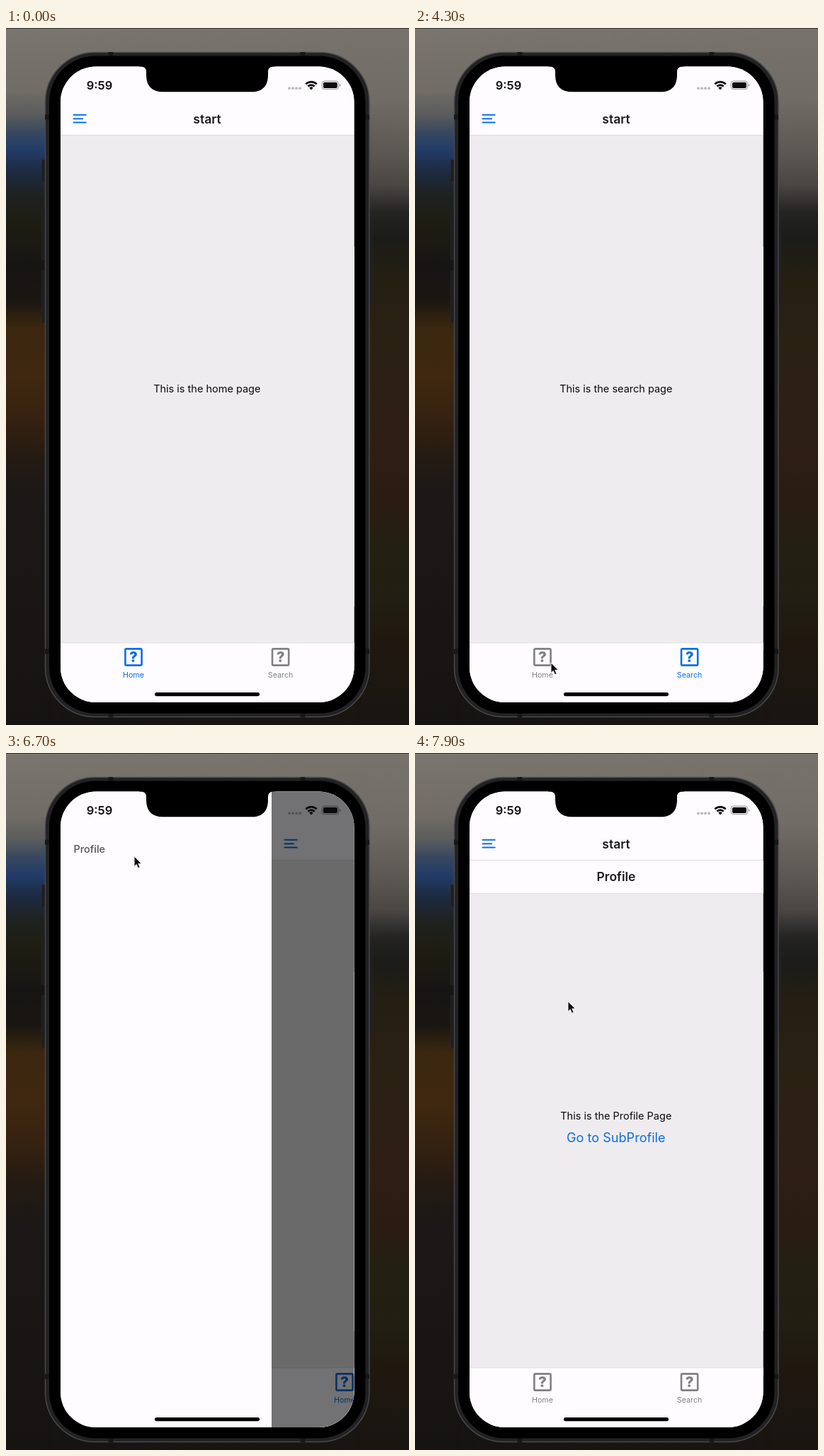
Write an HTML page that moves like this. It is 569 px wide and 985 px high and loops after 8000 ms.

```html
<!DOCTYPE html>
<html lang="en">
<head>
<meta charset="utf-8">
<title>Drawer and tabs</title>
<style>
html, body { margin: 0; width: 100%; height: 100%; overflow: hidden; background: #191715; }
svg { display: block; width: 569px; height: 985px; font-family: Inter, "Noto Sans", sans-serif; }

.title { font-size: 17.5px; font-weight: 600; fill: #1c1b1f; text-anchor: middle; }
.body { font-size: 14.5px; fill: #0a0a0b; text-anchor: middle; }
.link { font-size: 18.1px; fill: #0a6ee6; text-anchor: middle; }
.label { font-size: 10.7px; fill: currentColor; text-anchor: middle; }
.mark { font-size: 20.5px; font-weight: 800; fill: currentColor; text-anchor: middle; }
.item { font-size: 14.4px; font-weight: 500; fill: #535255; }
.clock { font-size: 16.5px; font-weight: 600; fill: #0c0c0d; text-anchor: middle; }
.tab { color: #808082; }

/* one loop is 8 s, so 1% is 80 ms */
.slide { animation: slide 8s infinite; }
.shade { animation: shade 8s infinite; }
.menu { animation: press 8s linear infinite; }
.cursor { animation: move 8s linear infinite, blink 8s step-end infinite; }
.home { animation: home 8s step-end infinite; }
.search { animation: search 8s step-end infinite; }
.profile { animation: profile 8s step-end infinite; }
.tab-home { animation: tab-home 8s step-end infinite; }
.tab-search { animation: tab-search 8s step-end infinite; }

@keyframes slide {
  0%, 73.81% { transform: translateX(0); animation-timing-function: cubic-bezier(.3333, 1, .6667, 1); }
  82% { transform: translateX(298px); }
  88.15% { transform: translateX(298px); animation-timing-function: cubic-bezier(.3333, 1, .6667, 1); }
  96.3%, 100% { transform: translateX(0); }
}
@keyframes shade {
  0%, 73.81% { opacity: 0; animation-timing-function: cubic-bezier(.3333, 1, .6667, 1); }
  82% { opacity: .548; }
  88.15% { opacity: .548; animation-timing-function: cubic-bezier(.3333, 1, .6667, 1); }
  96.3%, 100% { opacity: 0; }
}
@keyframes press {
  0%, 73.4% { opacity: 1; }
  73.75% { opacity: .3; }
  74.8% { opacity: .3; }
  79%, 100% { opacity: 1; }
}
@keyframes move {
  0%, 1.25% { transform: translate(181px, 880px); }
  3.7% { transform: translate(167px, 506px); }
  17.5% { transform: translate(167px, 506px); }
  20% { transform: translate(184px, 418px); }
  21.25% { transform: translate(184px, 418px); }
  23.75% { transform: translate(138px, 250px); }
  25% { transform: translate(138px, 250px); }
  32.5% { transform: translate(285px, 826px); }
  33.75% { transform: translate(285px, 826px); }
  37.5% { transform: translate(400px, 893px); }
  39.5% { transform: translate(398px, 892px); }
  42.5% { transform: translate(325px, 891px); }
  45% { transform: translate(318px, 891px); }
  53.75% { transform: translate(192px, 897px); }
  55% { transform: translate(192px, 897px); }
  57.5% { transform: translate(184px, 897px); }
  62.5% { transform: translate(184px, 897px); }
  66.25% { transform: translate(189px, 306px); }
  72% { transform: translate(100px, 126px); }
  74.5% { transform: translate(100px, 126px); }
  76.25% { transform: translate(111px, 131px); }
  83.75% { transform: translate(181px, 146px); }
  87% { transform: translate(177px, 140px); }
  91.25% { transform: translate(177px, 140px); }
  98.75%, 100% { transform: translate(216px, 351px); }
}
@keyframes blink {
  0% { visibility: hidden; }
  1.2% { visibility: visible; }
  3.7% { visibility: hidden; }
  9.95% { visibility: visible; }
}
@keyframes home {
  0% { visibility: visible; }
  38.7% { visibility: hidden; }
  59.9% { visibility: visible; }
  88% { visibility: hidden; }
}
@keyframes search {
  0% { visibility: hidden; }
  38.7% { visibility: visible; }
  59.9% { visibility: hidden; }
}
@keyframes profile {
  0% { visibility: hidden; }
  88% { visibility: visible; }
}
@keyframes tab-home {
  0% { color: #0a6ee6; }
  38.7% { color: #808082; }
  59.9% { color: #0a6ee6; }
  88% { color: #808082; }
}
@keyframes tab-search {
  0% { color: #808082; }
  38.7% { color: #0a6ee6; }
  59.9% { color: #808082; }
}
</style>
</head>
<body>
<svg viewBox="0 0 569 985">
  <defs>
    <linearGradient id="left" x2="0" y2="1">
      <stop offset="0" stop-color="#7a766f"/>
      <stop offset=".09" stop-color="#716d66"/>
      <stop offset=".125" stop-color="#5a5b5c"/>
      <stop offset=".15" stop-color="#37475f"/>
      <stop offset=".175" stop-color="#223c68"/>
      <stop offset=".205" stop-color="#1d2a42"/>
      <stop offset=".24" stop-color="#1e2220"/>
      <stop offset=".28" stop-color="#1e1d12"/>
      <stop offset=".34" stop-color="#161514"/>
      <stop offset=".39" stop-color="#1a1612"/>
      <stop offset=".43" stop-color="#3b2710"/>
      <stop offset=".5" stop-color="#3f280f"/>
      <stop offset=".56" stop-color="#352210"/>
      <stop offset=".62" stop-color="#231a13"/>
      <stop offset=".68" stop-color="#1b1817"/>
      <stop offset="1" stop-color="#161413"/>
    </linearGradient>
    <linearGradient id="right" x2="0" y2="1">
      <stop offset="0" stop-color="#77736c"/>
      <stop offset=".1" stop-color="#716c66"/>
      <stop offset=".18" stop-color="#5c5752"/>
      <stop offset=".225" stop-color="#4a4643"/>
      <stop offset=".265" stop-color="#232322"/>
      <stop offset=".3" stop-color="#1b1b18"/>
      <stop offset=".36" stop-color="#251f12"/>
      <stop offset=".46" stop-color="#2a2113"/>
      <stop offset=".6" stop-color="#2e1e14"/>
      <stop offset=".69" stop-color="#2a1c11"/>
      <stop offset=".74" stop-color="#222010"/>
      <stop offset=".82" stop-color="#211e13"/>
      <stop offset=".88" stop-color="#20180f"/>
      <stop offset="1" stop-color="#191512"/>
    </linearGradient>
    <linearGradient id="fade">
      <stop offset=".1" stop-color="#000"/>
      <stop offset=".9" stop-color="#fff"/>
    </linearGradient>
    <mask id="blend"><rect width="569" height="985" fill="url(#fade)"/></mask>
    <clipPath id="screen"><rect x="77" y="54.5" width="414.5" height="898.5" rx="50"/></clipPath>
    <g id="icon">
      <rect x="-11.6" y="-11.6" width="23.2" height="23.2" rx="1.6" fill="none" stroke="currentColor" stroke-width="2.6"/>
      <text class="mark" y="7.4">?</text>
    </g>
  </defs>

  <rect width="569" height="985" fill="url(#left)"/>
  <rect width="569" height="985" fill="url(#right)" mask="url(#blend)"/>
  <rect width="569" height="1" fill="#33302e"/>

  <!-- phone body -->
  <g fill="#1d1d1f" stroke="#2e2e30" stroke-width=".6">
    <rect x="50.5" y="186" width="7" height="31" rx="1.5"/>
    <rect x="50.5" y="253" width="7" height="74" rx="1.5"/>
    <rect x="50.5" y="343" width="7" height="74" rx="1.5"/>
    <rect x="510" y="277" width="7" height="117" rx="1.5"/>
  </g>
  <rect x="55.5" y="34.5" width="457.5" height="939" rx="70" fill="#222224" stroke="#4a4a4c" stroke-width="1.4"/>
  <path d="M148 34v6M419 34v6M148 968v6M419 968v6M55 126h6M507 126h6M55 881h6M507 881h6" stroke="#171718" stroke-width="7"/>
  <rect x="61" y="39.5" width="446.5" height="929" rx="65"/>

  <g clip-path="url(#screen)">
    <rect x="77" y="54" width="415" height="900" fill="#fefcff"/>
    <g class="slide">
      <rect x="77" y="54" width="415" height="900" fill="#eeecef"/>
      <rect x="77" y="54" width="415" height="97" fill="#fefcff"/>
      <rect x="77" y="151" width="415" height="1" fill="#dddbde"/>
      <g class="menu" stroke="#0a6ee6" stroke-width="2" stroke-linecap="round">
        <path d="M95.5 122.8h17.2M95.5 128.2h12.6M95.5 133.6h17.2"/>
      </g>
      <text class="title" x="284" y="134.5">start</text>

      <text class="body home" x="283.8" y="515">This is the home page</text>
      <text class="body search" x="283.8" y="515">This is the search page</text>
      <g class="profile">
        <rect x="77" y="152" width="415" height="46" fill="#fefcff"/>
        <rect x="77" y="198" width="415" height="1" fill="#dddbde"/>
        <text class="title" x="284" y="181">Profile</text>
        <text class="body" x="283.8" y="518">This is the Profile Page</text>
        <text class="link" x="283.8" y="549.5">Go to SubProfile</text>
      </g>

      <rect x="77" y="868.5" width="415" height="86" fill="#fefcff"/>
      <rect x="77" y="868.3" width="415" height="1" fill="#dddbde"/>
      <g class="tab tab-home">
        <use href="#icon" x="180" y="889"/>
        <text class="label" x="180" y="918">Home</text>
      </g>
      <g class="tab tab-search">
        <use href="#icon" x="387.6" y="889"/>
        <text class="label" x="387.6" y="918">Search</text>
      </g>
      <rect class="shade" x="77" y="54" width="415" height="900"/>

      <g transform="translate(-298)">
        <rect x="77" y="54" width="298" height="900" fill="#fefcff"/>
        <text class="item" x="95.6" y="141">Profile</text>
      </g>
    </g>

    <!-- status bar and home indicator -->
    <text class="clock" x="132" y="87">9:59</text>
    <g fill="#000" fill-opacity=".27">
      <circle cx="400" cy="85.2" r="1.9"/><circle cx="405" cy="85.2" r="1.9"/>
      <circle cx="410" cy="85.2" r="1.9"/><circle cx="415" cy="85.2" r="1.9"/>
    </g>
    <g fill="none" stroke="#0a0a0b" stroke-width="2.7">
      <path d="M423.3 79.3a11 11 0 0 1 15.4 0M426.3 82.5a6.8 6.8 0 0 1 9.4 0"/>
    </g>
    <path d="M431 87.4l-2.7-2.8a3.8 3.8 0 0 1 5.4 0z" fill="#0a0a0b"/>
    <rect x="446.2" y="75" width="23.4" height="11.6" rx="3.4" fill="none" stroke="#000" stroke-opacity=".42"/>
    <rect x="447.9" y="76.7" width="20" height="8.2" rx="2" fill="#0a0a0b"/>
    <path d="M470.9 79v3.8q1.4-.6 1.4-1.9t-1.4-1.9z" fill-opacity=".45"/>
    <rect x="210" y="939" width="148" height="5.2" rx="2.6"/>
  </g>
  <path d="M188 53v1.5h2.5q7.5 0 7.5 7.5v4q0 24.3 24 24.3h124q24 0 24-24.3v-4q0-7.5 7.5-7.5h2.5V53z"/>

  <g class="cursor">
    <path d="M0 0v14.4l3.2-3 2.3 5.3 2.6-1.1-2.3-5.2h4.6z" fill="#0a0a0b" stroke="#fff" stroke-width=".9" stroke-linejoin="round"/>
  </g>
</svg>
</body>
</html>
```
